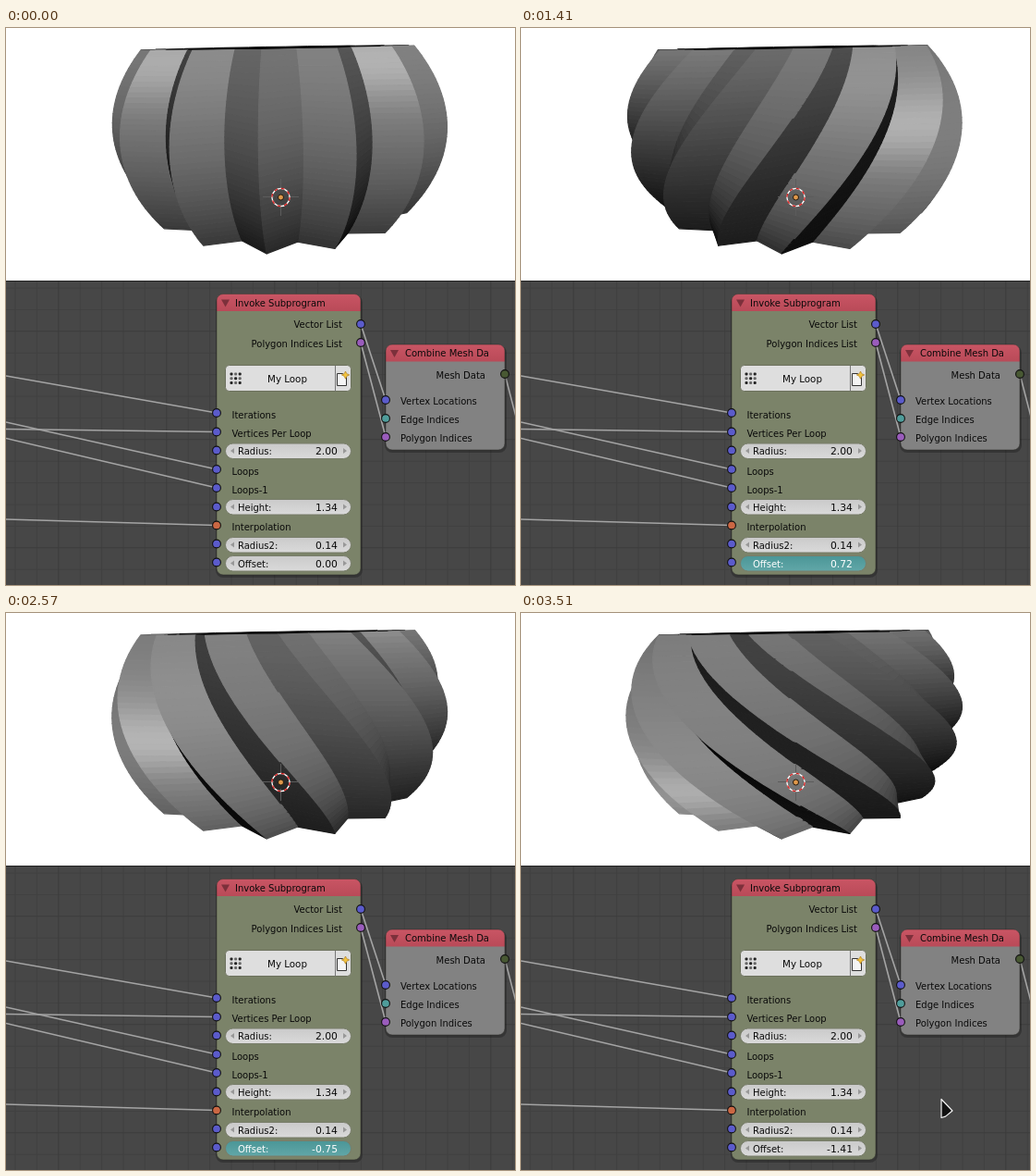
Recreate the animation shown at these times as an HTML page with a canvas. Size 551 px wide and 602 px high, loop 3.55 s.

```html
<!DOCTYPE html>
<html lang="en">
<head>
<meta charset="utf-8">
<title>Twisting bowl</title>
<style>
  html, body { margin: 0; width: 100%; height: 100%; overflow: hidden; background: #fff; }
  canvas, svg { position: absolute; left: 0; top: 0; display: block; }
  text { font: 10px "DejaVu Sans", Verdana, sans-serif; fill: #0a0a0a; white-space: pre; }
  .num { font-size: 10.8px; text-anchor: end; }
  .end { text-anchor: end; }
  .mid { text-anchor: middle; font-size: 10.3px; }
  .live text { fill: #fff; }
  .live .arrow { display: none; }
</style>
</head>
<body>
<canvas id="view" width="551" height="273"></canvas>
<svg id="ui" width="551" height="602" viewBox="0 0 551 602"></svg>
<script>
const LOOP = 3550;

// ---------- node editor ----------
const BLUE = '#5b5bcb', PURPLE = '#9a5cbc', TEAL = '#4f9d9b', ORANGE = '#cb6743', GREEN = '#485833';

const label = (x, y, s, cls = '') => `<text x="${x}" y="${y}" class="${cls}">${s}</text>`;
const socket = (x, y, fill) =>
  `<circle cx="${x}" cy="${y}" r="4.4" fill="${fill}" stroke="#111" stroke-width="1.1"/>`;
const wire = (x1, y1, x2, y2) =>
  `<path d="M${x1} ${y1}L${x2} ${y2}" stroke="#a4a4a4" stroke-width="1.6"/>`;
const node = (x, y, w, h, body, title, tx) => `
  <rect x="${x - 1}" y="${y + 1}" width="${w + 3}" height="${h + 2}" rx="8" fill="#000" opacity=".25"/>
  <rect x="${x}" y="${y}" width="${w}" height="${h}" rx="7" fill="${body}"/>
  <path d="M${x} ${y + 18.5}v-11.5a7 7 0 0 1 7-7h${w - 14}a7 7 0 0 1 7 7v11.5z" fill="url(#head)"/>
  <rect x="${x}" y="${y}" width="${w}" height="${h}" rx="7" fill="none" stroke="#2b2b26" stroke-opacity=".5"/>
  <path d="M${x + 5} ${y + 6}h9l-4.5 8z" fill="#7c303b"/>
  ${label(tx, y + 13.3, title)}`;
const slider = (y, name, value, id = '') => `
  <g id="${id}">
    <rect x="237.5" y="${y + .5}" width="136" height="16.5" rx="8.2" fill="url(#field)" stroke="#787d6a"/>
    <path class="arrow" d="M247 ${y + 5.5}v6l-4-3zM365 ${y + 5.5}v6l4-3z" fill="#989898"/>
    ${label(251, y + 12.5, name)}${label(359, y + 12.7, value, 'num')}
  </g>`;
const grad = (id, a, b) =>
  `<linearGradient id="${id}" x1="0" y1="0" x2="0" y2="1"><stop stop-color="${a}"/><stop offset="1" stop-color="${b}"/></linearGradient>`;

function grid() {
  const step = 23.4;
  let fine = '', bold = '';
  for (let i = 0; i < 24; i++) {
    const x = (10 + i * step).toFixed(1), y = (281 + i * step).toFixed(1);
    let d = `M${x} 274V602`;
    if (i < 14) d += `M0 ${y}H551`;
    if (i % 5 === 2) bold += d; else fine += d;
  }
  return `<path d="${fine}" stroke="#414141"/><path d="${bold}" stroke="#3c3c3c"/>`;
}

function dots() {
  let s = '';
  for (let r = 0; r < 3; r++)
    for (let c = 0; c < 3; c++)
      s += `<rect x="${242.5 + c * 4.6}" y="${372.5 + r * 4.8}" width="3" height="3" rx="1" fill="${(r + c) % 2 ? '#666' : '#222'}"/>`;
  return s;
}

const crosshair = `
  <path d="M278 182.5h12M305 182.5h12M297.5 163v12M297.5 190v13" stroke="#5c5c5c"/>
  <circle cx="297.5" cy="183" r="9.6" fill="none" stroke="#fff" stroke-width="1.3"/>
  <circle cx="297.5" cy="183" r="9.6" fill="none" stroke="#d81e1e" stroke-width="1.3" stroke-dasharray="3.77"/>
  <circle cx="297.5" cy="183" r="3" fill="#e0984a" stroke="#20180e"/>`;

const inputs = [
  [416, BLUE, 'Iterations'], [436.5, BLUE, 'Vertices Per Loop'], [456.5, BLUE],
  [477, BLUE, 'Loops'], [497, BLUE, 'Loops-1'], [517.5, BLUE],
  [537.5, ORANGE, 'Interpolation'], [557.5, BLUE], [577.5, BLUE]
];
const inputs2 = [[402, BLUE, 'Vertex Locations'], [422, TEAL, 'Edge Indices'], [442, PURPLE, 'Polygon Indices']];

document.getElementById('ui').innerHTML = `
  <defs>
    ${grad('head', '#c95564', '#b94a58')}${grad('field', '#cacaca', '#dadada')}
    ${grad('hover', '#dadada', '#eeeeee')}${grad('edit', '#4b9697', '#61a7a8')}
  </defs>
  ${crosshair}
  <rect y="273" width="551" height="329" fill="#474747"/>
  ${grid()}
  <path d="M0 273.5H551" stroke="#222"/>
  <g fill="none">
    ${wire(0, 376, 228, 416)}${wire(0, 433.5, 228, 436.5)}${wire(0, 426, 228, 477)}
    ${wire(0, 443.5, 228, 497)}${wire(0, 531, 228, 537.5)}${wire(540, 374, 553, 424)}
  </g>
  ${node(228, 287.5, 156, 303.5, '#7b8369', 'Invoke Subprogram', 248)}
  ${node(411, 342, 129, 114, '#828282', 'Combine Mesh Da', 432)}
  <g fill="none">${wire(384, 320, 411, 402)}${wire(384, 340, 411, 442)}</g>
  ${label(364, 324, 'Vector List', 'end')}${label(364, 345, 'Polygon Indices List', 'end')}
  ${label(519, 379, 'Mesh Data', 'end')}
  <rect x="237.5" y="364.5" width="136" height="28" rx="4" fill="#dedede" stroke="#6c715d"/>
  <path d="M356.5 365v27.5" stroke="#777"/>
  ${dots()}${label(304.5, 382.5, 'My Loop', 'mid')}
  <path d="M358.5 373.5h6l4 4v9h-10z" fill="#f4f4f4" stroke="#333"/>
  <path d="M367.5 371l1.4 2.7 2.9 1.2-2.9 1.4-1.4 2.9-1.4-2.9-2.8-1.4 2.8-1.2z" fill="#f2c33c" stroke="#a87416" stroke-width=".6"/>
  ${slider(448.5, 'Radius:', '2.00')}${slider(509, 'Height:', '1.34')}
  ${slider(550, 'Radius2:', '0.14')}${slider(570, 'Offset:', '0.00', 'offset')}
  ${inputs.map(([y, c, s]) => socket(228, y, c) + (s ? label(244.5, y + 5.5, s) : '')).join('')}
  ${inputs2.map(([y, c, s]) => socket(411, y, c) + label(427, y + 5, s)).join('')}
  ${socket(384, 320, BLUE)}${socket(384, 340, PURPLE)}${socket(540, 374, GREEN)}
  <path id="mouse" d="M0 0V20L4.5 18.6 12 12.5z" fill="#111" stroke="#f4f4f4" stroke-width="1.2" stroke-linejoin="round"/>`;

// ---------- bowl ----------
const ctx = document.getElementById('view').getContext('2d');
const COLS = 30, ROWS = 36, RAD = Math.PI / 180;
const DIST = 3.7, ZOOM = 490, EYE_Y = 16.5, DROP = 0.036, HEIGHT = 1.217, ROLL = 0.017;
const LIGHT = [0.02, 0.55, 0.83], SHINE = [-0.06, 0.42, 0.905];

const dot = (a, b) => a[0] * b[0] + a[1] * b[1] + a[2] * b[2];
const sub = (a, b) => [a[0] - b[0], a[1] - b[1], a[2] - b[2]];

function point(i, t, twist) {
  const r = (1 + 1.07 * t - 0.995 * t * t) * (i % 2 ? 0.85 : 1);
  const a = (12 * i - 5) * RAD + twist * t;
  return [r * Math.sin(a), -DROP - HEIGHT * (1 - t), r * Math.cos(a)];
}

function project([x, y, z]) {
  const s = ZOOM / (DIST - z);
  const dx = x * s, dy = EYE_Y - y * s - 183;
  return [297 + dx + dy * ROLL, 183 + dy - dx * ROLL];
}

function shade(a, b, d) {
  const u = sub(b, a), v = sub(d, a);
  const n = [u[1] * v[2] - u[2] * v[1], u[2] * v[0] - u[0] * v[2], u[0] * v[1] - u[1] * v[0]];
  const len = Math.hypot(...n);
  const lit = Math.max(0, dot(n, LIGHT) / len), gloss = Math.max(0, dot(n, SHINE) / len);
  const g = Math.round(Math.min(255, 6 + 130 * lit + 48 * gloss ** 45));
  return `rgb(${g},${g},${g})`;
}

function trace(pts) {
  ctx.beginPath();
  pts.forEach(([x, y]) => ctx.lineTo(x, y));
  ctx.closePath();
}

function drawBowl(twist) {
  ctx.fillStyle = '#fff';
  ctx.fillRect(0, 0, 551, 273);

  const rings = [];
  for (let j = 0; j <= ROWS; j++) {
    const ring = [];
    for (let i = 0; i < COLS; i++) {
      const p = point(i, j / ROWS, twist);
      ring.push({ p, q: project(p) });
    }
    rings.push(ring);
  }

  trace(rings[ROWS].map(v => v.q));
  ctx.fillStyle = ctx.strokeStyle = '#050505';
  ctx.lineWidth = 1;
  ctx.fill();
  ctx.stroke();

  const faces = [];
  for (let j = 0; j < ROWS; j++) {
    for (let i = 0; i < COLS; i++) {
      const k = (i + 1) % COLS;
      const f = [rings[j][i], rings[j][k], rings[j + 1][k], rings[j + 1][i]];
      const [a, b, c, d] = f.map(v => v.q);
      const area = (c[0] - a[0]) * (d[1] - b[1]) - (c[1] - a[1]) * (d[0] - b[0]);
      if (area < 0) faces.push({ f, z: f.reduce((s, v) => s + v.p[2], 0) });
    }
  }
  faces.sort((m, n) => m.z - n.z);
  // wide enough to close the seams between faces
  ctx.lineWidth = 1.2;
  ctx.lineJoin = 'round';
  for (const { f } of faces) {
    trace(f.map(v => v.q));
    ctx.fillStyle = ctx.strokeStyle = shade(f[0].p, f[1].p, f[3].p);
    ctx.fill();
    ctx.stroke();
  }
}

// ---------- timing ----------
const TWIST = [[760, 0], [1080, 0.34], [1410, 0.72], [1540, 0.8], [1660, 0.66], [1930, 0.24],
  [2250, -0.28], [2570, -0.75], [2830, -1.12], [3050, -1.35], [3210, -1.41]];
const ENTER = [[230, 389, 558], [380, 345, 573], [520, 309, 579], [650, 305, 578]];
const LEAVE = [[3250, 312, 579], [3330, 350, 571], [3420, 425, 542], [3510, 455, 525.5]];
const EDIT_FROM = 760, EDIT_TO = 3250;

function sample(keys, t, col = 1) {
  if (t <= keys[0][0]) return keys[0][col];
  for (let i = 1; i < keys.length; i++) {
    const a = keys[i - 1], b = keys[i];
    if (t < b[0]) return a[col] + (b[col] - a[col]) * (t - a[0]) / (b[0] - a[0]);
  }
  return keys[keys.length - 1][col];
}

const mouse = document.getElementById('mouse');
const offset = document.getElementById('offset');
const bar = offset.querySelector('rect'), num = offset.querySelector('.num');
let shown = null;

function render(now) {
  const t = now % LOOP;
  const twist = Math.round(sample(TWIST, t) * 100) / 100;
  const editing = t >= EDIT_FROM && t < EDIT_TO;
  const path = t < EDIT_FROM ? ENTER : LEAVE;
  const visible = t >= 230 && !editing;
  const x = sample(path, t), y = sample(path, t, 2);
  const hover = visible && x > 237 && x < 374 && y > 570 && y < 587;

  mouse.setAttribute('visibility', visible ? 'visible' : 'hidden');
  mouse.setAttribute('transform', `translate(${x.toFixed(1)} ${y.toFixed(1)})`);
  offset.setAttribute('class', editing ? 'live' : '');
  bar.setAttribute('fill', `url(#${editing ? 'edit' : hover ? 'hover' : 'field'})`);
  if (twist !== shown) {
    shown = twist;
    num.textContent = twist.toFixed(2);
    drawBowl(twist);
  }
  requestAnimationFrame(tick);
}

const start = performance.now();
function tick() { render(performance.now() - start); }
tick();
</script>
</body>
</html>
```
